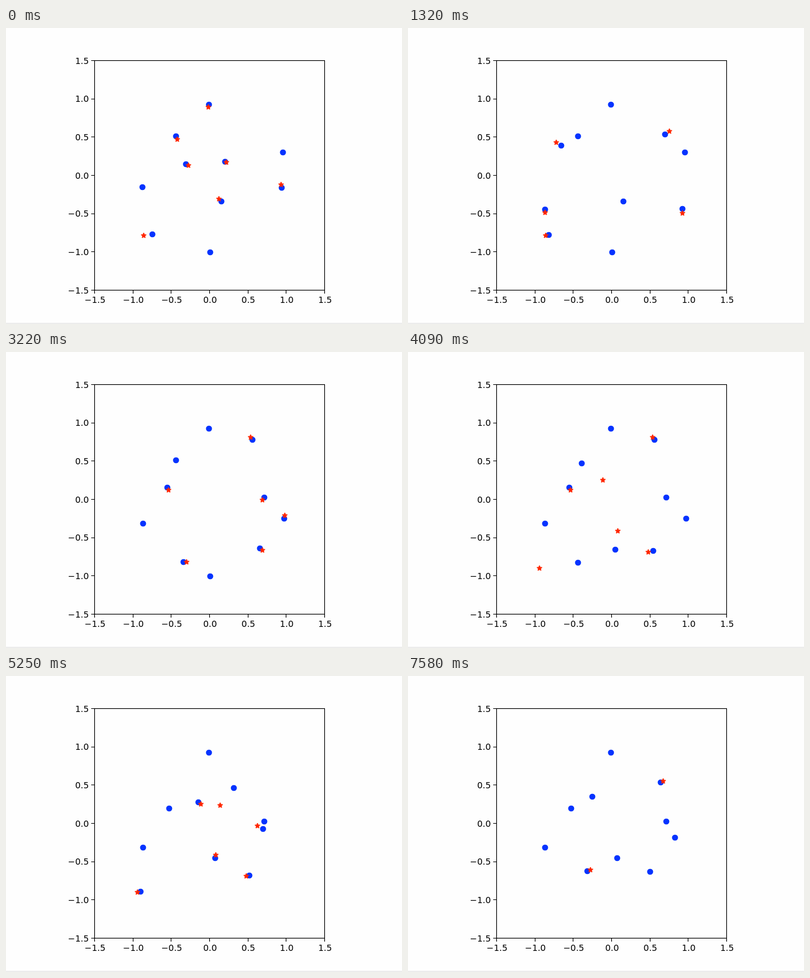
Animation, 637 px wide and 477 px high, one loop 8 s. Source, as an HTML page:

```html
<!DOCTYPE html>
<html lang="en">
<head>
<meta charset="utf-8">
<title>Agents and goals</title>
<style>
  html, body { margin: 0; width: 100%; height: 100%; overflow: hidden; background: #fefefe; }
  svg { display: block; }
  text { font: 13.89px "DejaVu Sans", sans-serif; }
  .line { fill: none; stroke: #000; stroke-width: 1.11; }
  .dot { fill: #0433ff; }
  .star { fill: #ff2600; stroke: #ff2600; stroke-width: 1.39; stroke-linejoin: bevel; }
</style>
</head>
<body>
<svg id="stage" width="637" height="477" viewBox="0 0 637 477">
  <rect y="475" width="637" height="2" fill="#ececec"/>
  <g id="plot" transform="translate(.5 .5)"></g>
</svg>
<script>
const LOOP = 8000, STEP = 145.7, LAST_STEP = 52;
const SPEED = 8.6;      // pixels per step
const REACH = 5;        // an agent halts this close to its goal
const LIFETIME = 14;    // steps before a goal disappears
const stage = document.getElementById('stage');
const plot = document.getElementById('plot');

function add(parent, tag, attributes, content = '') {
  const node = document.createElementNS('http://www.w3.org/2000/svg', tag);
  for (const key in attributes) node.setAttribute(key, attributes[key]);
  node.textContent = content;
  parent.append(node);
  return node;
}

function drawAxes() {
  const left = 142.5, top = 52.5, size = 370, bottom = top + size;
  for (let i = 0; i <= 6; i++) {
    const offset = size * i / 6;
    const x = Math.floor(left + offset) + 0.5;
    const y = Math.floor(bottom - offset) + 0.5;
    const label = (i / 2 - 1.5).toFixed(1).replace('-', '\u2212');
    add(stage, 'path', { class: 'line', d: `M${x} ${bottom}v5.4M${left} ${y}h-5.4` });
    add(stage, 'text', { x: left + 0.7 + offset, y: 443.4, 'text-anchor': 'middle' }, label);
    add(stage, 'text', { x: 133.3, y: bottom + 5 - offset, 'text-anchor': 'end' }, label);
  }
  add(stage, 'rect', { class: 'line', x: left, y: top, width: size, height: size });
}

function starPath() {
  const points = Array.from({ length: 10 }, (_, i) => {
    const radius = i % 2 ? 1.59 : 4.17, angle = i * Math.PI / 5;
    return [radius * Math.sin(angle), -radius * Math.cos(angle)];
  });
  return `M${points.join('L')}Z`;
}

const agents = [];

// Goals are [x, y, start step, lifetime]; a new goal replaces the one before.
function agent(x, y, ...goals) {
  agents.push({ x, y, goals, dot: add(plot, 'circle', { class: 'dot', r: 4.86 }) });
}

agent(326, 123, [325, 127, -9]);
agent(273, 174, [275, 179, -9], [313, 206, 27.2], [292, 191, 38, 5]);
agent(289, 219, [293, 221, -9], [238, 184, 2.9], [261, 222, 16.5], [265, 209, 31, 3]);
agent(352, 215, [354, 216, -9], [420, 166, 0.2, 17], [393, 137, 17.1], [344, 208, 30.3, 8.8], [410, 169, 44.2]);
agent(445, 200, [412, 238, 13.4]);
agent(443, 257, [442, 252, -9], [441, 298, 5], [448, 263, 18, 9], [404, 241, 31.3, 4.8], [433, 263, 44.3, 3]);
agent(346, 279, [342, 275, -9], [412, 319, 11.7], [386, 322, 26.3], [400, 324, 41], [386, 311, 46, 4]);
agent(219, 256, [220, 297, 1], [220, 271, 14, 3]);
agent(235, 332, [221, 334, 0], [290, 338, 9.2], [211, 348, 26.6], [293, 312, 39.3]);
agent(328, 361, [337, 288, 23]);

// Walks straight towards each goal in turn until it is reached or gone.
function follow({ x, y, goals }, step) {
  let goal = null;
  for (const [goalX, goalY, start, lifetime = LIFETIME] of goals) {
    const elapsed = step - start;
    if (elapsed < 0) break;
    const distance = Math.hypot(goalX - x, goalY - y);
    const walked = Math.min(SPEED * Math.min(elapsed, lifetime), Math.max(0, distance - REACH));
    x += (goalX - x) * walked / distance;
    y += (goalY - y) * walked / distance;
    goal = elapsed < lifetime ? [goalX, goalY] : null;
  }
  return { x: Math.round(x), y: Math.round(y), goal };
}

drawAxes();
for (const item of agents) item.star = add(plot, 'path', { class: 'star', d: starPath() });

function render(time) {
  const step = Math.min(LAST_STEP, Math.floor((time % LOOP + 8) / STEP));
  for (const item of agents) {
    const { x, y, goal } = follow(item, step);
    item.dot.setAttribute('cx', x);
    item.dot.setAttribute('cy', y);
    item.star.style.display = goal ? '' : 'none';
    if (goal) item.star.setAttribute('transform', `translate(${goal})`);
  }
}

const begin = performance.now();
function tick() {
  render(performance.now() - begin);
  requestAnimationFrame(tick);
}
tick();
</script>
</body>
</html>
```
